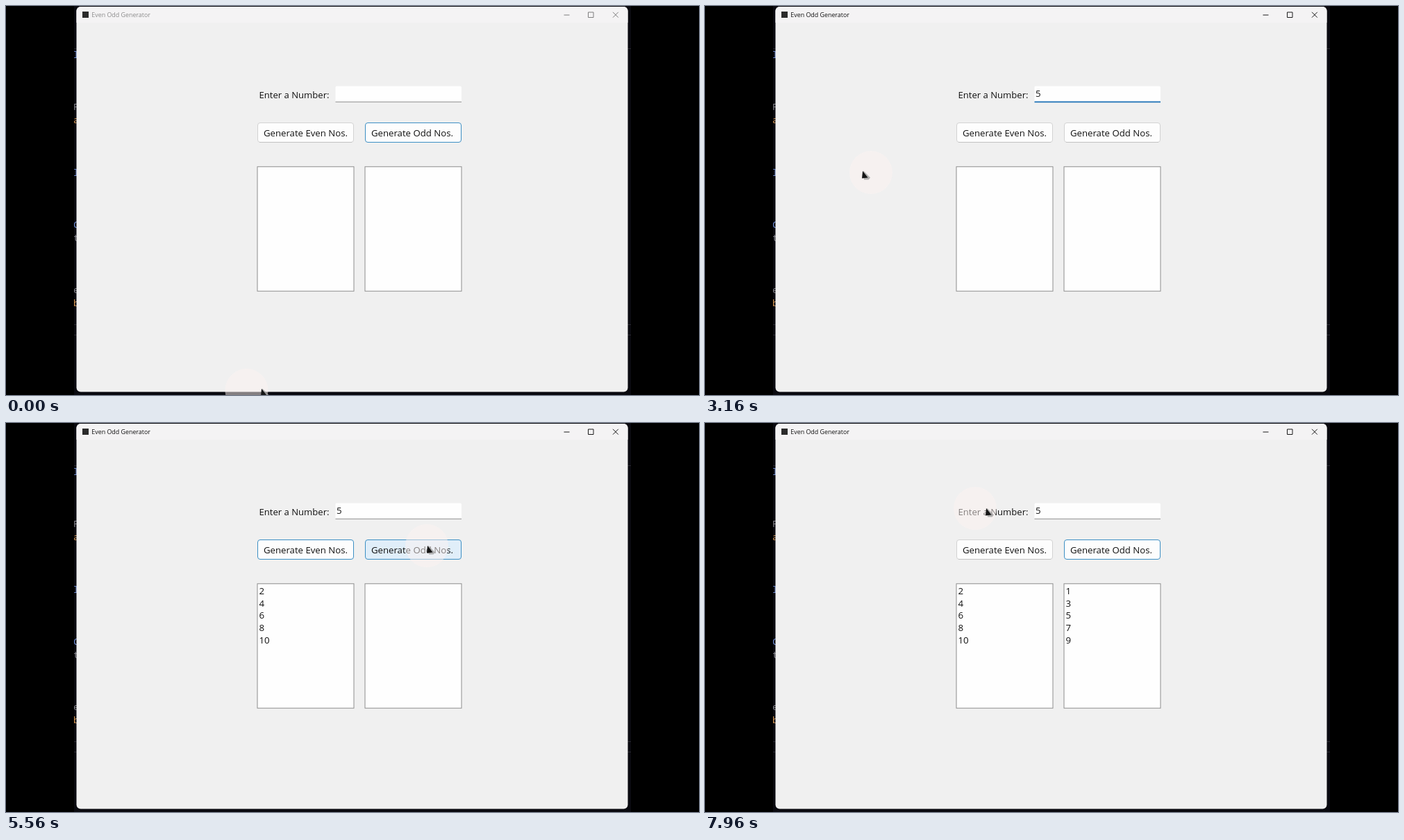
An HTML page for the animation above (8000 ms loop, 998 by 561 pixels).

```html
<!DOCTYPE html>
<html lang="en">
<head>
<meta charset="utf-8">
<title>Even Odd Generator</title>
<style>
  html, body { margin: 0; width: 100%; height: 100%; overflow: hidden; background: #000; }
  svg { display: block; width: 998px; height: 561px; }
  text { font: 13.1px "Open Sans", "Noto Sans", sans-serif; fill: #111; white-space: pre; }
  .code text { font: 13px "Noto Sans Mono", "DejaVu Sans Mono", monospace; }
  .num { font-size: 13.3px; }
  #caption text { font-size: 8.9px; }
  #caption path { fill: none; stroke: #1b1b1b; stroke-width: 1; }
  #caption.idle text { fill: #8c8c8c; }
  #caption.idle path { stroke: #7d7d7d; }
  .btn text { font-size: 13.2px; }
  .btn rect { fill: #fdfdfd; stroke: #d2d2d2; }
  .btn path { stroke: #c2c2c2; }
  .btn.focus rect, .btn.hover rect { stroke: #3c8fc4; }
  .btn.focus path, .btn.hover path { stroke: none; }
  .btn.hover rect { fill: #e0eef9; }
  .list rect { fill: #fefefe; stroke: #8c8c8c; }
  #underline { stroke: #8c8c8c; }
  #underline.editing { stroke: #1a6fb5; stroke-width: 1.8; }
  .off { display: none; }
</style>
</head>
<body>
<svg viewBox="0 0 998 561">
  <defs>
    <clipPath id="screen"><rect x="98" width="802" height="561"/></clipPath>
  </defs>
  <rect width="998" height="561"/>
  <g clip-path="url(#screen)">
    <rect x="98" width="802" height="561" fill="#0a0a10"/>
    <path d="M98 61.5h802M98 459.5h802M98 474.5h802" stroke="#292930"/>
    <g class="code" id="code"></g>

    <rect x="101.5" y="1" width="794" height="555.5" rx="6" fill="#f0f0f0"/>
    <path d="M101.5 24V7a6 6 0 0 1 6-6h782a6 6 0 0 1 6 6v17z" fill="#f4f3f4"/>
    <g id="caption">
      <rect x="110" y="8" width="9" height="9" fill="#2b2b2b"/>
      <text x="123.3" y="16">Even Odd Generator</text>
      <path d="M803.5 13h8M838.500 9h7.5v7.5h-7.500zM874 8.8l7.8 7.8m0-7.8l-7.8 7.8"/>
    </g>

    <text x="364.5" y="132.6">Enter a Number:</text>
    <rect x="474.5" y="115.5" width="181.5" height="23.5" rx="2" fill="#fefefe"/>
    <path id="underline" d="M474.500 138.300h181.500"/>
    <text class="num" id="entry" x="476" y="131.3">5</text>
    <path id="caret" d="M0 118v16.5" stroke="#111"/>

    <g id="even" class="btn">
      <rect x="362.5" y="168.5" width="138" height="28" rx="3.5"/>
      <path d="M365 196.5h133"/>
      <text x="371" y="188">Generate Even Nos.</text>
    </g>
    <g id="odd" class="btn">
      <rect x="517.5" y="168.5" width="138" height="28" rx="3.5"/>
      <path d="M520 196.5h133"/>
      <text x="526" y="188">Generate Odd Nos.</text>
    </g>
    <g class="list">
      <rect x="362" y="231.8" width="139" height="179.4"/>
      <rect x="517" y="231.8" width="139" height="179.4"/>
    </g>
    <g id="evens"></g>
    <g id="odds"></g>

    <circle id="halo" r="31" fill="#fdf3f1" fill-opacity=".5"/>
    <g id="pointer">
      <path d="M1.5 0L3 .5 12 9.5 9.500 12.5 3 12.500z" fill="#999" opacity=".75"/>
      <path d="M1 0L8.5 9.5 0 10.500z" fill="#151515"/>
    </g>
  </g>
</svg>
<script>
  const LOOP = 8000, STEP = 40, LAG = 10, BLINK = 530;
  const FOCUS = 240, TYPED = 2040, EVEN_CLICK = 3520, BLUR = 3640, ODD_CLICK = 5920;
  const FIELD = [545, 128], EVEN = [406, 177], ODD = [606, 177];
  const $ = id => document.getElementById(id);

  // Each glide bends from the last stop, past `via`, to its own stop.
  const glides = [];
  let stop = [367, 552];
  function glide(begin, end, via, to) {
    glides.push({ begin, end, from: stop, via, to });
    stop = to;
  }

  glide(0, 200, [567, 522], FIELD);
  glide(280, 880, [680, 150], [788, 316]);
  glide(2800, 3200, [420, 270], [176, 230]);
  glide(3200, 3480, [240, 180], EVEN);
  glide(3640, 4240, [540, 300], [782, 385]);
  glide(4240, 4440, [780, 290], [731, 207]);
  glide(4440, 4800, [650, 182], [592, 182]);
  glide(4960, 5160, [650, 230], [716, 243]);
  glide(5280, 5360, [660, 210], ODD);
  glide(5880, 6720, [794, 300], [618, 437]);
  glide(6720, 6960, [530, 436], [509, 430]);
  glide(6960, 7320, [330, 440], [85, 354]);
  glide(7480, 7520, [85, 161], [152, 161]);
  glide(7800, 7960, [284, 123], [404, 123]);

  function at(t) {
    const g = glides.findLast(s => s.begin <= t) || glides[0];
    const p = Math.min((t - g.begin) / (g.end - g.begin), 1), q = 1 - p;
    return g.from.map((a, i) => q * q * a + 2 * p * q * g.via[i] + p * p * g.to[i]);
  }

  function label(parent, x, y, str, fill) {
    const el = document.createElementNS("http://www.w3.org/2000/svg", "text");
    el.setAttribute("x", x);
    el.setAttribute("y", y);
    el.textContent = str;
    if (fill) el.style.fill = fill; else el.setAttribute("class", "num");
    parent.append(el);
  }

  // Code showing behind the window's left edge, one letter per line
  const tints = { l: "#7393dc", C: "#7393dc", a: "#d99a55", b: "#d99a55" };
  [..."l   Fa   l   Ct   eb"].forEach((c, i) => {
    if (c !== " ") label($("code"), 97, 75 + i * 18.85, c, tints[c] || "#85858c");
  });

  for (let i = 0; i < 5; i++) {
    const y = 246.8 + i * 17.75;
    label($("evens"), 364.5, y, 2 * i + 2);
    label($("odds"), 519.5, y, 2 * i + 1);
  }

  const within = (t, a, b) => t >= a && t < b;
  const flag = (id, name, on) => $(id).classList.toggle(name, on);
  const show = (id, on) => flag(id, "off", !on);
  const move = (id, [x, y]) => $(id).setAttribute("transform", `translate(${x} ${y})`);

  function button(id, left, [x, y], focus) {
    flag(id, "hover", within(x, left, left + 139) && within(y, 168, 197));
    flag(id, "focus", focus);
  }

  function draw(t) {
    const pos = at(t);
    move("pointer", pos);
    move("halo", at(t - LAG));
    show("pointer", !within(t, TYPED, 2800));

    const typed = t >= TYPED;
    const blinkOn = Math.floor((t - (typed ? TYPED : FOCUS)) / BLINK) % 2 === 0;
    flag("caption", "idle", t < FOCUS);
    flag("underline", "editing", within(t, FOCUS, BLUR));
    show("entry", typed);
    show("caret", within(t, FOCUS, 2640) && blinkOn);
    move("caret", [typed ? 484.3 : 477, 0]);

    button("even", 362, pos, within(t, EVEN_CLICK, ODD_CLICK));
    button("odd", 517, pos, t < FOCUS || t >= ODD_CLICK);
    show("evens", t >= EVEN_CLICK + STEP);
    show("odds", t >= ODD_CLICK);
  }

  const start = performance.now();
  function tick() {
    const t = (performance.now() - start) % LOOP;
    draw(Math.floor(t / STEP) * STEP);
    requestAnimationFrame(tick);
  }
  draw(0);
  requestAnimationFrame(tick);
</script>
</body>
</html>
```
